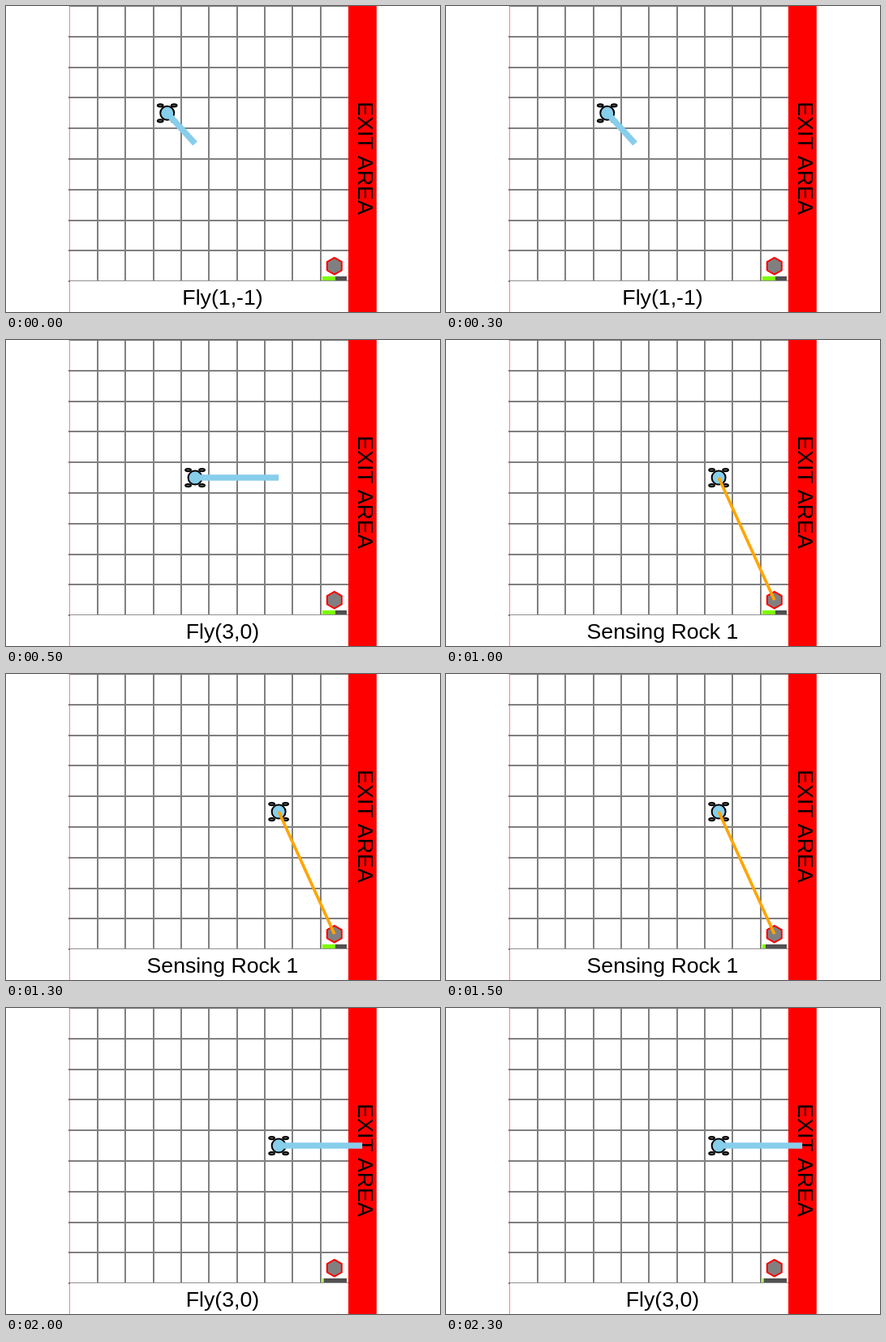
An HTML page with a canvas for the animation above (2.5 s loop, 535 by 378 pixels).

```html
<!DOCTYPE html>
<html lang="en">
<head>
<meta charset="utf-8">
<title>Drone grid</title>
<style>
  html, body { margin: 0; width: 100%; height: 100%; overflow: hidden; background: #fff; }
  canvas { display: block; }
</style>
</head>
<body>
<canvas id="stage" width="535" height="378"></canvas>
<script>
const ctx = document.getElementById("stage").getContext("2d");
const LEFT = 78.5, CELL_W = 34.35, CELL_H = 37.8;
const EXIT_X = LEFT + 10 * CELL_W;
const STEP_MS = 500;
const ROCK = [9, 8];

// Each step: drone cell, beam target cell, caption and remaining charge in pixels.
const steps = [
  { drone: [3, 3], target: [4, 4], label: "Fly(1,-1)", charge: 16 },
  { drone: [4, 4], target: [7, 4], label: "Fly(3,0)", charge: 16 },
  { drone: [7, 4], target: ROCK, label: "Sensing Rock 1", charge: 16, sensing: true },
  { drone: [7, 4], target: ROCK, label: "Sensing Rock 1", charge: 4, sensing: true },
  { drone: [7, 4], target: [10, 4], label: "Fly(3,0)", charge: 2 }
];

const center = ([col, row]) => [LEFT + (col + 0.5) * CELL_W, (row + 0.5) * CELL_H];

function line(x1, y1, x2, y2, color, width) {
  ctx.strokeStyle = color;
  ctx.lineWidth = width;
  ctx.beginPath();
  ctx.moveTo(x1, y1);
  ctx.lineTo(x2, y2);
  ctx.stroke();
}

function box(x, y, w, h, color) {
  ctx.fillStyle = color;
  ctx.fillRect(x, y, w, h);
}

function text(label, x, y, angle = 0) {
  ctx.save();
  ctx.translate(x, y);
  ctx.rotate(angle);
  ctx.font = "26.7px 'Liberation Sans', Arial, sans-serif";
  ctx.textAlign = "center";
  ctx.fillStyle = "#000";
  ctx.fillText(label, 0, 0);
  ctx.restore();
}

function drawGrid() {
  box(0, 0, 535, 378, "#fff");
  for (let col = 1; col < 10; col++) {
    const x = Math.round(LEFT + col * CELL_W);
    line(x, 0, x, 340, "#808080", 2);
  }
  for (let row = 0; row < 9; row++) {
    const y = Math.round(row * CELL_H);
    line(LEFT - 1, y, EXIT_X, y, "#808080", 2);
  }
  line(LEFT, 339.5, EXIT_X, 339.5, "#909090", 1);
  line(LEFT, 0, LEFT, 378, "#ff8080", 1);
  for (let row = 1; row < 10; row++) {
    box(77, Math.round(row * CELL_H) - 1, 2, 2, "#707880");
  }
  box(EXIT_X, 0, CELL_W + 0.5, 378, "#f00");
  text("EXIT AREA", 434, 188, Math.PI / 2);
}

function drawRock(charge) {
  const [x, y] = center(ROCK);
  ctx.beginPath();
  for (let i = 0; i < 6; i++) {
    const a = i * Math.PI / 3 - Math.PI / 2;
    ctx.lineTo(x + 10.4 * Math.cos(a), y + 10.4 * Math.sin(a));
  }
  ctx.closePath();
  ctx.fillStyle = "#808080";
  ctx.fill();
  ctx.strokeStyle = "#f00";
  ctx.lineWidth = 2;
  ctx.stroke();
  box(390, 334, 30, 5, "#505050");
  box(390, 334, charge, 5, "#7cfc00");
}

function drawDrone([x, y]) {
  ctx.strokeStyle = "#000";
  ctx.lineWidth = 2;
  ctx.fillStyle = "#808080";
  for (const sx of [-1, 1]) {
    for (const sy of [-1, 1]) {
      ctx.beginPath();
      ctx.ellipse(x + sx * 8.5, y + sy * 9.5, 3.4, 1.6, 0, 0, 2 * Math.PI);
      ctx.fill();
      ctx.stroke();
    }
  }
  ctx.fillStyle = "#87ceeb";
  ctx.beginPath();
  ctx.arc(x, y, 8.5, 0, 2 * Math.PI);
  ctx.fill();
  ctx.stroke();
}

function draw(now) {
  const step = steps[Math.floor(now / STEP_MS) % steps.length];
  const drone = center(step.drone);
  drawGrid();
  drawRock(step.charge);
  drawDrone(drone);
  const [color, width] = step.sensing ? ["#ffa500", 3.7] : ["#87ceeb", 7.5];
  line(...drone, ...center(step.target), color, width);
  text(step.label, 267, 369);
}

const start = performance.now();
function tick() {
  draw(performance.now() - start);
  requestAnimationFrame(tick);
}
tick();
</script>
</body>
</html>
```
